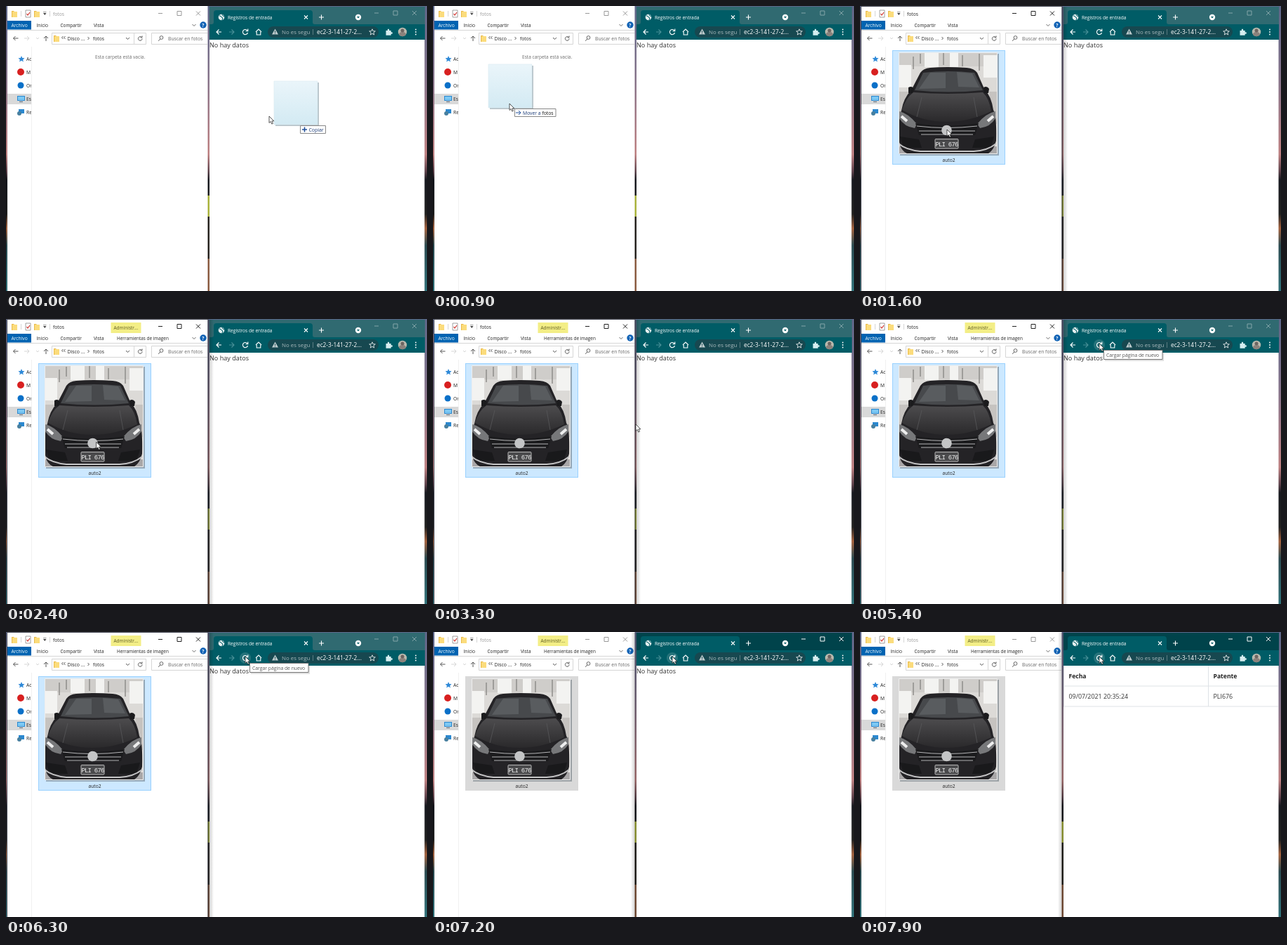
An HTML page for the animation above (8000 ms loop, 600 by 406 pixels).

```html
<!DOCTYPE html>
<html lang="es">
<head>
<meta charset="utf-8">
<style>
  html, body { margin: 0; width: 100%; height: 100%; overflow: hidden; background: #fff; }
  svg { display: block; width: 600px; height: 406px; }
  text { font-family: "Open Sans", "Noto Sans", sans-serif; font-size: 6.7px; fill: #222; white-space: pre; }
  .line { fill: none; stroke: #444; stroke-width: .9; }
  .thin { fill: none; stroke: #ccc; stroke-width: .8; }
  .lite { fill: none; stroke: #fff; stroke-width: 1.1; }
  .fine { stroke-width: .8; }
  .page text { font-size: 8.9px; fill: #333; }
  .page .head { font-size: 8.6px; font-weight: 700; fill: #222; }
</style>
</head>
<body>
<svg viewBox="0 0 600 406">
  <defs>
    <linearGradient id="wall" x2="0" y2="1">
      <stop offset="0" stop-color="#5d6688"/>
      <stop offset=".25" stop-color="#85738a"/>
      <stop offset=".52" stop-color="#bd7f80"/>
      <stop offset=".58" stop-color="#5c4049"/>
      <stop offset=".61" stop-color="#17191f"/>
      <stop offset=".73" stop-color="#20201f"/>
      <stop offset=".78" stop-color="#a2603c"/>
      <stop offset=".84" stop-color="#2a4a50"/>
      <stop offset="1" stop-color="#2f7078"/>
    </linearGradient>
    <linearGradient id="ice" x2="0" y2="1">
      <stop offset="0" stop-color="#eaf5fa"/>
      <stop offset="1" stop-color="#d3eaf3"/>
    </linearGradient>
    <linearGradient id="hood" x2="0" y2="1">
      <stop offset="0" stop-color="#4d4c4e"/>
      <stop offset="1" stop-color="#2a292b"/>
    </linearGradient>
    <linearGradient id="shade">
      <stop offset="0" stop-opacity=".25"/>
      <stop offset="1" stop-opacity="0"/>
    </linearGradient>
    <clipPath id="nav"><rect x="2" y="58" width="34" height="348"/></clipPath>
    <clipPath id="frame"><rect x="55" y="66" width="141" height="145"/></clipPath>
    <g id="folder">
      <path d="M-4-4h3l1 1h4v8h-8z" fill="#e9b949"/>
      <path d="M-3-3h7v8h-7z" fill="#fbdc7c"/>
    </g>
    <path id="controls" d="M-30 .5h6M-3-2.500h6v6h-6zM24-2.500l6 6M30-2.500l-6 6" fill="none" stroke="currentColor"/>
  </defs>

  <rect width="600" height="406" fill="url(#wall)"/>
  <path d="M287 270h3v30h-3z" fill="#a9b23c"/>
  <path d="M287 300h3v60h-3z" fill="#26231f"/>
  <path d="M287 360h3v46h-3z" fill="#8a5b40"/>

  <!-- File explorer -->
  <g id="explorer">
    <rect x="2" y="0" width="285.500" height="406" fill="#fff"/>
    <use href="#folder" x="12" y="11"/>
    <path class="thin" d="M21.500 7v8M62.500 7v8"/>
    <path d="M28 6h7v10h-7z" fill="#fff" stroke="#888" stroke-width=".8"/>
    <path d="M29.500 11l1.500 2 3-4" fill="none" stroke="#d2322d" stroke-width="1.200"/>
    <use href="#folder" x="44" y="11"/>
    <path d="M53 10h4.500l-2.200 3zM53 8.500h4.500v.6h-4.500z" fill="#444"/>
    <text id="title" x="67" y="13.500">fotos</text>
    <use id="leftControls" href="#controls" x="247" y="10"/>

    <path d="M2 21h34v12.500h-34z" fill="#0063b1"/>
    <text x="7.500" y="29.800" style="fill:#fff">Archivo</text>
    <text x="43.500" y="29.800">Inicio</text>
    <text x="77.500" y="29.800" style="font-size:6.400px">Compartir</text>
    <text x="125" y="29.800" style="font-size:6.500px">Vista</text>
    <g id="tools">
      <path d="M149.500 5h43v15h-43z" fill="#f3ee86"/>
      <text x="153.500" y="14.500" style="fill:#5c5922;font-size:6.500px">Administr...</text>
      <text x="158" y="29.800" style="font-size:6.400px">Herramientas de imagen</text>
    </g>
    <path class="thin" d="M2 34.500h285"/>
    <path class="line fine" d="M265.500 26l2.500 2.500 2.500-2.500"/>
    <circle cx="281" cy="27" r="4.700" fill="#0f62b5"/>
    <text x="279.300" y="29.600" style="fill:#fff;font-weight:700">?</text>

    <path class="line" d="M17.500 46h-7M13.500 43l-3 3 3 3"/>
    <path class="thin" d="M26 46h7M30 43l3 3-3 3M43 45l2 2 2-2"/>
    <path class="line" d="M57 50v-7M54 46l3-3 3 3"/>
    <path class="thin" d="M65.500 38.500h134v16h-134zM182.500 39v15M287 38.500h-79.500v16h79.500"/>
    <use href="#folder" x="72" y="46"/>
    <path class="line" d="M81.500 43l-2 2 2 2M84.500 43l-2 2 2 2"/>
    <text x="87.500" y="48.500" style="font-size:6.900px">Disco ...</text>
    <path class="line" d="M116.500 44l2 2-2 2M171 45l2.500 2.500 2.500-2.500"/>
    <text x="124" y="48.500">fotos</text>
    <path class="line" d="M193 44.300a2.800 2.800 0 1 0 1 2M194 42.500v2.300h-2.400"/>
    <circle class="line fine" cx="221.500" cy="45" r="2.400"/>
    <path class="line" d="M219.700 47l-2.500 2.800"/>
    <text x="231" y="48.600" style="fill:#666;font-size:6.800px">Buscar en fotos</text>

    <path d="M2 125h34v15h-34z" fill="#d9d9d9"/>
    <path d="M22 71l1.300 3 3.200.3-2.400 2.100.8 3.100-2.900-1.700-2.900 1.700.8-3.100-2.400-2.100 3.200-.3z" fill="#2f8ad8"/>
    <circle cx="21" cy="94" r="5" fill="#d82020"/>
    <circle cx="21" cy="113" r="4.500" fill="#0a70c8"/>
    <path d="M16 128h11v7h-11z" fill="#2b88cf"/>
    <path d="M17 129h9v5h-9z" fill="#7cc8f4"/>
    <path d="M19 136.500h5" stroke="#567"/>
    <path d="M18 147h8v6h-8z" fill="#2b88cf"/>
    <circle cx="19" cy="153" r="3" fill="#477f9f"/>
    <g clip-path="url(#nav)">
      <text x="29" y="77.500">Acc</text><text x="29" y="96.500">M</text>
      <text x="29" y="115.500">On</text><text x="29" y="134.500">Es</text>
      <text x="29" y="153.500">Re</text>
    </g>
    <path d="M36.500 58v348" stroke="#f0f0f0"/>
    <text id="empty" x="127" y="75" style="fill:#6d6d6d;font-size:6.600px">Esta carpeta está vacía.</text>

    <g id="item">
      <rect id="select" x="46.500" y="63.500" width="160" height="162"/>
      <path d="M57 68h141v145h-141z" fill="#5f6a72" opacity=".5"/>
      <g clip-path="url(#frame)">
        <path d="M55 66h141v145h-141z" fill="#dcdad7"/>
        <path d="M55 66h141v20h-141z" fill="#cfcdca"/>
        <path d="M92 66h20v21h-20zM128 66h12v22h-12zM55 84h18v32h-18zM176 70h20v32h-20z" fill="#f3f3f1"/>
        <path d="M86 68v14M119 66v18M146 70v16M170 68v24M76 72v18" stroke="#8f8d8b" stroke-width="1.500"/>
        <path d="M55 122h20l-8 30h-12zM184 122h12v46h-8z" fill="#c6c3c0"/>
        <path d="M55 200h141v11h-141z" fill="#a9a7a8"/>
        <path d="M86 95q4-6 14-7 24-2 52 0 11 1 15 7l11 25q9 8 12 28 5 8 4 44-3 13-11 18h-116q-9-4-11-16-2-34 3-45 3-18 14-29z" fill="#242326"/>
        <path d="M90 95q35-4 73 0l12 25q-49 5-97 0z" fill="#47494c"/>
        <path d="M100 95h22v22l-38 1zM138 94l22 2 10 20-30-1z" fill="#595c5f"/>
        <path d="M76 123q49 4 99 0 9 8 12 27-31 15-64 15-34 0-63-17 5-17 16-25z" fill="url(#hood)"/>
        <path d="M88 130l-7 28M162 130l5 28" stroke="#58585b" stroke-width=".8"/>
        <path d="M69 116q6-3 8 3l-2 5h-6zM176 116q5-3 8 2l-1 6h-6z" fill="#1b1b1d"/>
        <path d="M56 150q13 3 25 18l-3 6q-15-2-22-14zM193 150q-14 3-26 18l4 6q15-2 22-14z" fill="#77787a"/>
        <path d="M59 157l8 7M190 157l-8 7" stroke="#eee" stroke-width="4"/>
        <path d="M79 167q44 7 90 0l-5 17h-80z" fill="#1b1b1d"/>
        <path d="M81 171q42 5 86 0M84 178h80M87 183h74" fill="none" stroke="#b5b5b7"/>
        <path d="M57 186l27 4 4 12h-26zM191 186l-27 4-4 12h26z" fill="#19191b"/>
        <path d="M55 196q10 9 31 11h76q20-1 32-11" fill="none" stroke="#c4c4c5" stroke-width="2"/>
        <circle cx="123.500" cy="177" r="7.300" fill="#c4c5c6"/>
        <rect x="107" y="189.500" width="33" height="13.500" rx="1" fill="#4a4a4c" stroke="#b8b8b8"/>
        <text x="123.500" y="200" text-anchor="middle" style="fill:#f4f4f4;font:9px 'Liberation Mono',monospace;letter-spacing:-.8px">PLI 676</text>
      </g>
      <path d="M55.500 66.500h140v144h-140z" fill="none" stroke="#eee"/>
      <text x="126.500" y="222" text-anchor="middle">auto2</text>
    </g>
    <path id="edge" d="M1.500 406v-405.500h286.500v405.500" fill="none" stroke="#454854"/>
  </g>

  <!-- Browser -->
  <g id="browser">
    <path id="strip" d="M290 1h307v47.500h-307z"/>
    <path d="M290 26h3q3 0 3-3v-13q0-4 4-4h133q4 0 4 4v13q0 3 3 3h157v22h-307z" fill="#005c66"/>
    <circle cx="307" cy="16" r="4.300" fill="#e4eff0"/>
    <path d="M304 14q3 0 3 2l2 1-1 3M308 12q0 2 3 3" stroke="#005c66" fill="none"/>
    <text x="316" y="18.500" style="fill:#fff;font-size:6.600px">Registros de entrada</text>
    <path class="lite" d="M425 13.500l5 5M430 13.500l-5 5M446 16h7M449.500 12.500v7"/>
    <circle cx="502" cy="16" r="4.200" fill="#fff"/>
    <path d="M500 15h4l-2 2.500z" fill="#005c66"/>
    <use id="rightControls" href="#controls" x="555" y="9.500"/>

    <circle id="hover" cx="341" cy="37" r="8" fill="#26737b"/>
    <path class="lite" d="M307 37h-7M303.500 33.500l-3.500 3.500 3.500 3.500M344 35a3.600 3.600 0 1 0 .5 3M344.800 32.500v3.200h-3.200M356 37l4-4 4 4M357.200 37v4h5.600v-4"/>
    <path class="lite" d="M318 37h7M321.500 33.500l3.500 3.500-3.500 3.500" style="stroke:#4a9098"/>
    <rect x="373" y="29" width="158" height="16" rx="8" fill="#174850"/>
    <path d="M383.500 32.500l4.500 8h-9z" fill="#bcc9cb"/>
    <path d="M383.500 35.500v2.500M383.500 39v.8" stroke="#174850"/>
    <text x="393" y="39.800" style="fill:#a9babd;font-size:7.900px">No es segu</text>
    <path d="M437.500 33v8" stroke="#6c8a8e" stroke-width=".8"/>
    <text x="443" y="39.800" style="fill:#fff;font-size:8.300px">ec2-3-141-27-2...</text>
    <path class="lite fine" d="M522 32.800l1.200 2.900 3.100.2-2.400 2 .8 3.100-2.700-1.700-2.700 1.700.8-3.100-2.400-2 3.100-.2z"/>
    <path d="M541.500 35h2.300q-.5-2.500 1.200-2.500t1.200 2.500h2.500v2.300q2.300-.3 2.300 1.200t-2.300 1.200v2h-7.200z" fill="#d5eef0"/>
    <circle cx="565" cy="37" r="6.200" fill="#b9b9ae"/>
    <path d="M560 41q0-4 5-4t5 4q-5 4.500-10 0" fill="#8b827c"/>
    <circle cx="565" cy="35" r="2.500" fill="#6c6460"/>
    <g fill="#fff"><circle cx="584" cy="33.500" r=".9"/><circle cx="584" cy="37" r=".9"/><circle cx="584" cy="40.500" r=".9"/></g>

    <path d="M290 48h306.500v358h-306.500z" fill="#fff"/>
    <g class="page">
      <text id="nodata" x="290" y="58.800" style="font-size:9.100px">No hay datos</text>
      <g id="table">
        <path d="M290.500 48v58.500M290 77h306M290 106h306M496.500 48v58" stroke="#dee2e6"/>
        <text class="head" x="297.500" y="66">Fecha</text>
        <text class="head" x="503.500" y="66">Patente</text>
        <text x="297.500" y="95">09/07/2021 20:35:24</text>
        <text x="503.500" y="95">PLI676</text>
      </g>
    </g>
  </g>

  <!-- The window in front shades its neighbour -->
  <rect id="shadeRight" x="288" y="1" width="8" height="405" fill="url(#shade)"/>
  <rect id="shadeLeft" width="8" height="405" fill="url(#shade)" transform="translate(290 1) scale(-1 1)"/>

  <g id="tip">
    <path d="M349 46h84v14h-84z" opacity=".12"/>
    <path d="M347.500 44.500h83.500v13h-83.500z" fill="#fff" stroke="#777"/>
    <text x="351" y="53.600" style="fill:#555;font-size:6.800px">Cargar página de nuevo</text>
  </g>

  <g id="ghost">
    <path d="M2 2h62v62h-62z" fill="#7c929d" opacity=".55"/>
    <path d="M0 0h62v62h-62z" fill="url(#ice)" stroke="#d8e9f0" stroke-width=".6"/>
    <g id="copy">
      <path d="M37.500 63.500h36v11h-36z" fill="#fff" stroke="#888"/>
      <path d="M40 69h7M43.500 65.500v7" stroke="#1f4f9a" stroke-width="1.600"/>
      <text x="49.500" y="71.600" style="fill:#1c3c78;font-size:6.900px">Copiar</text>
    </g>
    <g id="move">
      <path d="M37.500 63.500h58.500v11h-58.500z" fill="#fff" stroke="#888"/>
      <path d="M39 69h7M43 66l3 3-3 3" fill="none" stroke="#1f4f9a"/>
      <text x="49" y="71.600" style="fill:#1c3c78;font-size:6.800px">Mover a <tspan style="fill:#111">fotos</tspan></text>
    </g>
  </g>

  <path id="arrow" d="M0 0v9.500l2.200-2 1.600 3.600 1.700-.8-1.600-3.400h3z" fill="#fff" stroke="#111" stroke-width=".7"/>
  <path id="beam" d="M-2-4.500h1.500l.5.500.5-.5h1.500M0-4v8M-2 4.500h1.500l.5-.5.5.5h1.500" fill="none" stroke="#333" stroke-width=".8"/>
</svg>

<script>
const LOOP = 8000, STEP = 100;
const $ = id => document.getElementById(id);
const show = (id, on) => $(id).style.display = on ? "" : "none";
const place = (id, [x, y]) => $(id).setAttribute("transform", `translate(${x} ${y})`);

// time, x, y of the pointer tip
const path = [
  [-100, 412, 163], [0, 375, 157], [700, 109, 139], [1100, 109, 139],
  [1500, 124, 176], [2300, 124, 176], [3300, 289, 150],
  [4300, 336, 51], [4600, 336, 51], [4900, 341, 35], [LOOP, 341, 35]
];

function pointer(t) {
  const i = path.findIndex(k => k[0] > t);
  const [t0, x0, y0] = path[i - 1], [t1, x1, y1] = path[i];
  const p = (t - t0) / (t1 - t0), e = p * p * (3 - 2 * p);
  // The first drag is already under way, so it only slows down.
  const k = t0 === 0 ? 1 - (1 - p) ** 2 : t0 < 0 ? p : e;
  return [x0 + (x1 - x0) * k, y0 + (y1 - y0) * k];
}

function draw(t) {
  const tip = pointer(t), [lagX, lagY] = pointer(t - STEP);
  const dropped = t >= 1200, clicked = t >= 6900, loaded = t >= 7300;
  const leftActive = dropped && !clicked;
  const overText = tip[0] > 291 && tip[0] < 346 && tip[1] > 48 && tip[1] < 60;

  place("arrow", tip);
  place("beam", tip);
  show("arrow", !overText);
  show("beam", overText);

  place("ghost", [lagX - 30, lagY - 56]);
  show("ghost", !dropped);
  show("copy", lagX > 288);
  show("move", lagX <= 288);

  show("empty", !dropped);
  show("item", dropped);
  show("tools", t >= 1800);
  show("edge", leftActive);
  show("shadeRight", leftActive);
  show("shadeLeft", clicked);
  $("title").style.fill = leftActive ? "#222" : "#999";
  $("leftControls").style.color = leftActive ? "#222" : "#999";
  $("select").style.cssText = leftActive ? "fill:#cce8ff;stroke:#99d1ff" : "fill:#d9d9d9;stroke:#d9d9d9";

  $("strip").style.fill = clicked ? "#00434b" : "#306a71";
  $("rightControls").style.color = clicked ? "#fff" : "#83a5a9";
  show("hover", t >= 4800);
  show("tip", t >= 5400 && !clicked);
  show("nodata", !loaded);
  show("table", loaded);
}

const start = performance.now();
function tick() {
  const t = (performance.now() - start) % LOOP;
  draw(Math.floor(t / STEP) * STEP);
  requestAnimationFrame(tick);
}
tick();
</script>
</body>
</html>
```
